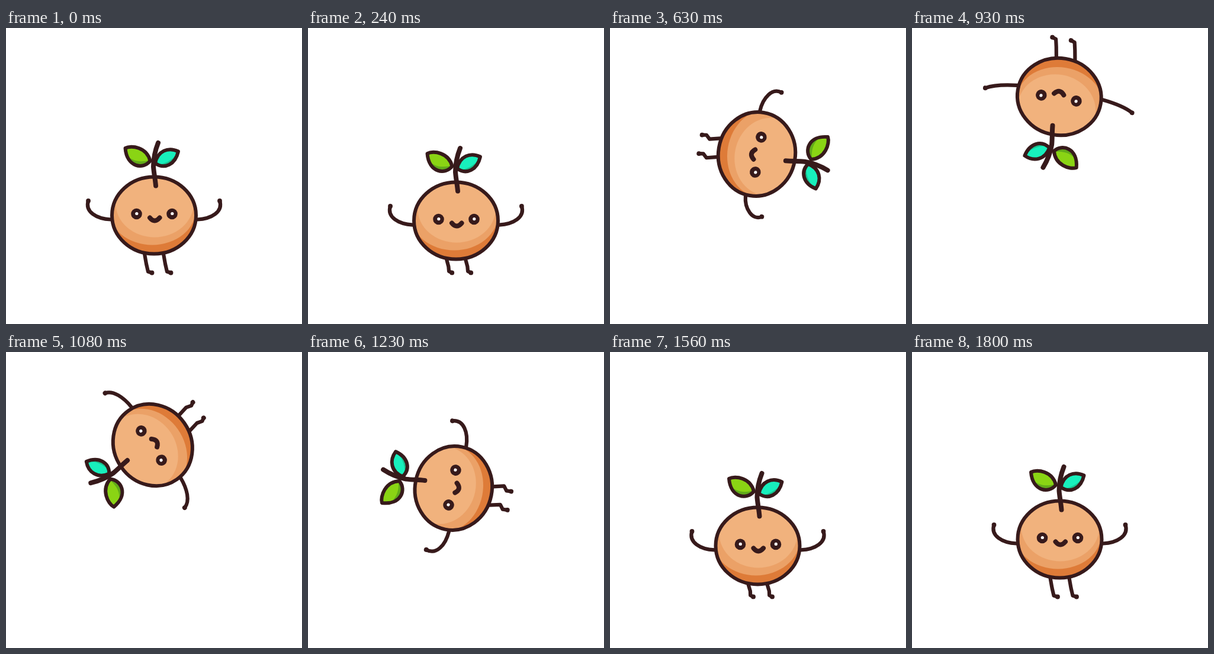
An HTML page with a canvas for the animation above (1.83 s loop, 500x500 px).

```html
<!DOCTYPE html>
<html lang="en">
<head>
<meta charset="utf-8">
<title>Fruit flip</title>
<style>
  html, body { margin: 0; width: 100%; height: 100%; overflow: hidden; background: #fff; }
  canvas { display: block; width: 500px; height: 500px; }
</style>
</head>
<body>
<canvas id="stage" width="500" height="500"></canvas>
<script>
const ctx = document.getElementById('stage').getContext('2d');
const LOOP = 1830, STEP = 30;
const INK = '#371a1b';

// Key points of the jump: time, x, y, angle in degrees
const jump = [
  [310, 250, 316.5, 0],
  [420, 252, 286, 23.6],
  [630, 248, 213, 99.6],
  [930, 248.8, 116, 189.6],
  [1230, 245.8, 230, 281.5],
  [1380, 242, 302.5, 329],
  [1520, 249.5, 316.5, 360]
];

// Arm curves from the shoulder outwards: two controls, then the hand
const ARM = {
  rest: [24, -1, 44, -13, 38, -31.5],
  curl: [17, -3, 31, -33, 7, -42],
  open: [18, -2, 38, -5, 53, -13]
};
// Leg joints from the hip: knee, ankle, toe
const LEG = {
  straight: [3, 17, 6, 30, 12.5, 32],
  tucked: [4.5, 18, -2.5, 23.5, -2, 31.5]
};

const clamp = u => Math.max(0, Math.min(1, u));
const mix = (a, b, k) => a.map((v, i) => v + (b[i] - v) * k);

function ramp(t, from, to) {
  const u = clamp((t - from) / (to - from));
  return u * u * (3 - 2 * u);
}

// Smooth hill of height 1
function bump(t, mid, half) {
  return Math.cos(Math.PI / 2 * clamp(Math.abs(t - mid) / half)) ** 2;
}

const slope = (a, b, k) => (b[k] - a[k]) / (b[0] - a[0]);

// Smooth tangent that never overshoots a turning point
function tangent(keys, i, k) {
  if (i === 0 || i === keys.length - 1) return 0;
  const p = slope(keys[i - 1], keys[i], k), n = slope(keys[i], keys[i + 1], k);
  return p * n <= 0 ? 0 : 2 * p * n / (p + n);
}

function sample(keys, t) {
  let i = 0;
  while (i < keys.length - 2 && t >= keys[i + 1][0]) i++;
  const a = keys[i], b = keys[i + 1], d = b[0] - a[0];
  const u = clamp((t - a[0]) / d), v = 1 - u;
  return [1, 2, 3].map(k =>
    v * v * (1 + 2 * u) * a[k] + u * u * (3 - 2 * u) * b[k]
      + d * u * v * (v * tangent(keys, i, k) - u * tangent(keys, i + 1, k)));
}

function stroke(path, width) {
  ctx.strokeStyle = INK;
  ctx.lineWidth = width;
  ctx.stroke(path);
}

function oval(x, y, rx, ry, fill) {
  ctx.fillStyle = fill;
  ctx.beginPath();
  ctx.ellipse(x, y, rx, ry, 0, 0, 2 * Math.PI);
  ctx.fill();
}

function limb(x, y, mirror, trace, end) {
  ctx.save();
  ctx.translate(x, y);
  ctx.scale(mirror, 1);
  const path = new Path2D();
  path.moveTo(0, 0);
  trace(path);
  stroke(path, 6.2);
  oval(end[0], end[1], 3.9, 3.9, INK);
  ctx.restore();
}

function arm(side, curl, open) {
  const p = mix(mix(ARM.rest, ARM.curl, curl), ARM.open, open);
  limb(side * 73, 7, side, path => path.bezierCurveTo(...p), p.slice(4));
}

function leg(side, tuck, length) {
  const p = mix(LEG.straight, LEG.tucked, tuck).map((v, i) => i % 2 ? v * length : v);
  limb(side * 16, 65, 1, path => {
    for (let i = 0; i < 6; i += 2) path.lineTo(p[i], p[i + 1]);
  }, p.slice(4));
}

const skin = new Path2D();
skin.ellipse(0, 0, 71, 65, 0, 0, 2 * Math.PI);
const stem = new Path2D('M3 -50 C2 -62 0 -70 -1 -82 C-1 -98 2 -110 7 -122.5');
const smile = new Path2D('M-7 4 Q1 14 9.5 4');
const leaves = [
  { shape: new Path2D('M-48.5 -113.5 C-38 -119 -12 -115 -6.5 -92 C-18 -77 -46 -81 -48.5 -113.5Z'),
    shade: new Path2D('M-52 -108 C-40 -91 -24 -88 -5 -94 L-8 -74 L-48 -74Z'),
    light: '#8ad414', dark: '#62ab1a' },
  { shape: new Path2D('M2 -88 C6 -109 24 -116 41 -108 C36 -86 18 -77 2 -88Z'),
    shade: new Path2D('M1 -85 C18 -86 31 -92 43 -109 L42 -75 L8 -73Z'),
    light: '#18efbc', dark: '#19c391' }
];

function clipped(path, paint) {
  ctx.save();
  ctx.clip(path);
  paint();
  ctx.restore();
}

function fruit() {
  clipped(skin, () => {
    oval(0, 0, 80, 80, '#de7b38');
    oval(-3, -11, 74, 61, '#eba167');
    oval(1, -21, 66, 58, '#f1b27d');
  });
  stroke(skin, 6);
}

function leaf(l) {
  clipped(l.shape, () => {
    ctx.fillStyle = l.light;
    ctx.fill(l.shape);
    ctx.fillStyle = l.dark;
    ctx.fill(l.shade);
  });
  stroke(l.shape, 6);
}

function face() {
  for (const x of [-29.5, 30.5]) {
    oval(x, -2.5, 9.3, 9.3, INK);
    oval(x + 0.3, -3, 2.6, 2.6, '#fff');
  }
  stroke(smile, 8);
}

function draw(t) {
  const [x, y, angle] = sample(jump, t);
  const squat = 11 * (bump(t, 190, 180) + bump(t, 1550, 160));
  const spread = bump(t, 900, 340);
  const curl = bump(t, 480, 250) + bump(t, 1400, 160) / 2;
  const air = ramp(t, 300, 390) - ramp(t, 1390, 1470);
  const tuck = air * (1 - spread) + squat / 40;

  ctx.fillStyle = '#fff';
  ctx.fillRect(0, 0, 500, 500);
  ctx.save();
  ctx.translate(x, y + squat);
  ctx.rotate(angle * Math.PI / 180);
  ctx.lineCap = ctx.lineJoin = 'round';
  arm(-1, curl * 0.3, spread);
  arm(1, curl, spread);
  for (const side of [-1, 1]) leg(side, tuck, 1 - squat / 32);
  fruit();
  leaves.forEach(leaf);
  stroke(stem, 8);
  face();
  ctx.restore();
}

const start = performance.now();
function tick() {
  const t = (performance.now() - start) % LOOP;
  draw(Math.floor(t / STEP) * STEP);
  requestAnimationFrame(tick);
}
tick();
</script>
</body>
</html>
```
